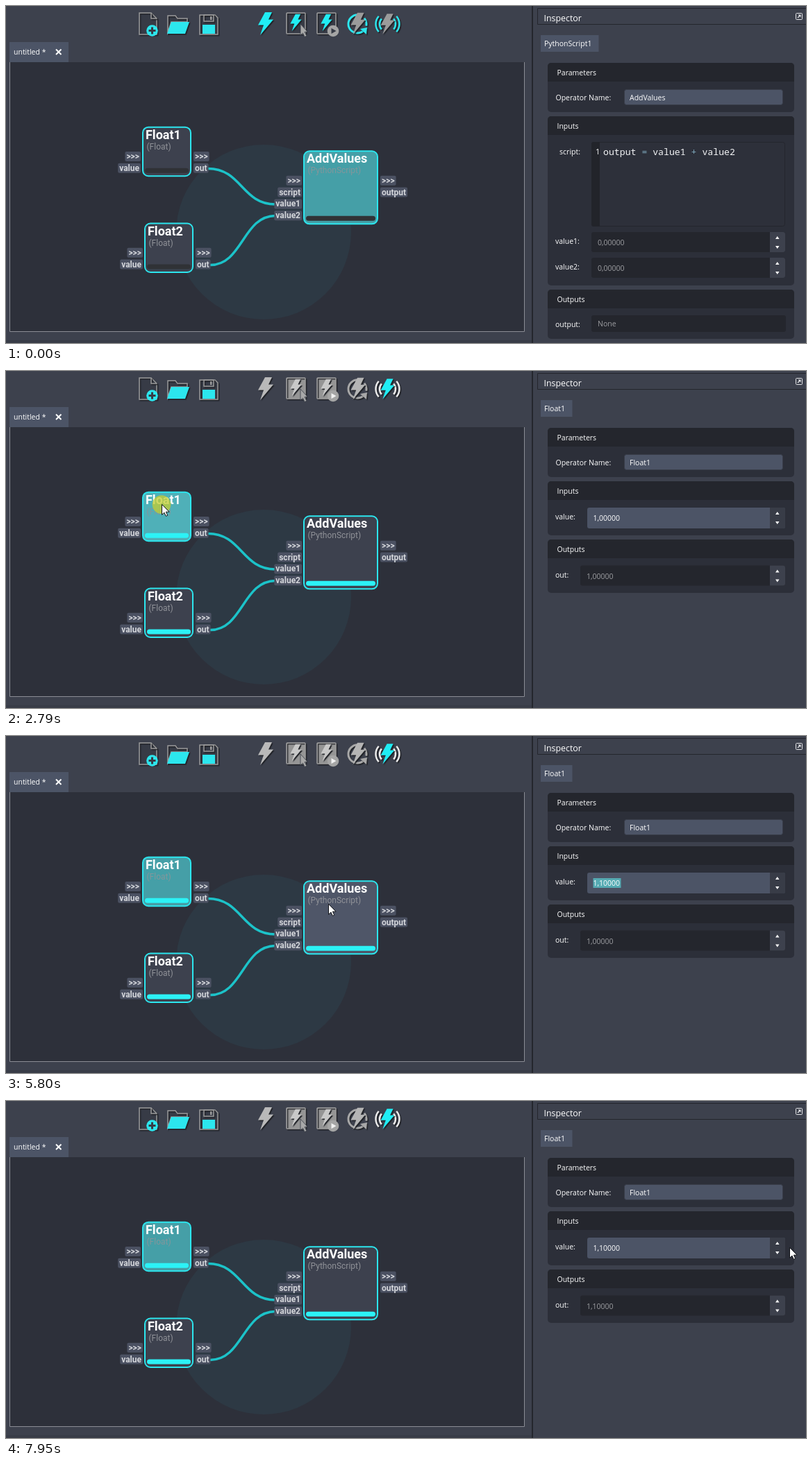
Animation, 1152 px wide and 486 px high, one loop 8000 ms. Source, as an HTML page with a canvas:

```html
<!DOCTYPE html>
<html lang="en">
<head>
<meta charset="utf-8">
<title>Node editor</title>
<style>
html, body { margin: 0; width: 100%; height: 100%; overflow: hidden; background: #3d414d; }
canvas { display: block; }
</style>
</head>
<body>
<canvas id="stage" width="1152" height="486"></canvas>
<script>
const ctx = document.getElementById('stage').getContext('2d');
const LOOP = 8000;
const C = {
  bg: '#3d414d', dark: '#24262d', body: '#2c2f39', field: '#4c5466', cyan: '#2ce6ee', wire: '#1cc3c9',
  teal: '#459fa7', tealHover: '#4fb0b8', text: '#ffffff', dim: '#909298', value: '#9c9da1', icon: '#373b46'
};
const UI = '"Open Sans", "Noto Sans", sans-serif';

// Cursor path: time, x, y
const PATH = [
  [130, 992, 402], [330, 760, 125], [530, 562, 4], [660, 536, 21], [1720, 536, 21],
  [1980, 451, 83], [2510, 224, 192], [3000, 224, 192], [3400, 640, 230], [3800, 1120, 200],
  [3930, 1113, 202], [5070, 1113, 202], [5800, 464, 242], [6550, 464, 242], [6670, 432, 240],
  [6950, 226, 194], [7120, 226, 194], [7820, 1127, 210], [7950, 1128, 211]
];
const CLICKS = [[1450, 1580], [2790, 2850], [4130, 4200], [5940, 6000], [7090, 7150]];

const within = (t, a, b) => t >= a && t < b;
const inside = (p, x, y, w, h) => p && p.x >= x && p.x <= x + w && p.y >= y && p.y <= y + h;

function cursorAt(t) {
  if (t < PATH[0][0]) return null;
  const next = PATH.findIndex(key => key[0] > t);
  if (next < 0) return { x: 1128, y: 211 };
  const [t0, x0, y0] = PATH[next - 1], [t1, x1, y1] = PATH[next];
  const f = (t - t0) / (t1 - t0);
  return { x: Math.round(x0 + (x1 - x0) * f), y: Math.round(y0 + (y1 - y0) * f) };
}

function rect(x, y, w, h, fill, r = 0, stroke, line = 1) {
  ctx.beginPath();
  ctx.roundRect(x, y, w, h, r);
  if (fill) { ctx.fillStyle = fill; ctx.fill(); }
  if (stroke) { ctx.strokeStyle = stroke; ctx.lineWidth = line; ctx.stroke(); }
}

function poly(points, fill, stroke, line = 1) {
  ctx.beginPath();
  points.forEach(([x, y]) => ctx.lineTo(x, y));
  ctx.closePath();
  if (fill) { ctx.fillStyle = fill; ctx.fill(); }
  if (stroke) { ctx.strokeStyle = stroke; ctx.lineWidth = line; ctx.stroke(); }
}

function path(points, color, line) {
  ctx.beginPath();
  points.forEach(([x, y]) => ctx.lineTo(x, y));
  ctx.strokeStyle = color;
  ctx.lineWidth = line;
  ctx.stroke();
}

function disc(x, y, r, fill) {
  ctx.beginPath();
  ctx.arc(x, y, r, 0, Math.PI * 2);
  ctx.fillStyle = fill;
  ctx.fill();
}

function arc(x, y, r, from, to, color, line) {
  ctx.beginPath();
  ctx.arc(x, y, r, from, to);
  ctx.strokeStyle = color;
  ctx.lineWidth = line;
  ctx.stroke();
}

function write(str, x, y, font, color = C.text, align = 'left') {
  ctx.font = font;
  ctx.fillStyle = color;
  ctx.textAlign = align;
  ctx.fillText(str, x, y);
}

const ui = (str, x, y, color, size = 10.5, align) => write(str, x, y, `${size}px ${UI}`, color, align);

function raised(draw) {
  ctx.save();
  ctx.shadowColor = '#202227';
  ctx.shadowOffsetX = ctx.shadowOffsetY = 1.5;
  ctx.shadowBlur = 1;
  draw();
  ctx.restore();
}

const BOLT = [[-1, -16.5], [9, -16.5], [4, -6], [11, -6], [-8, 16.5], [-3, 2], [-11, 2]];
const bolt = (x, y, s, color) =>
  raised(() => poly(BOLT.map(([dx, dy]) => [x + dx * s, y + dy * s]), color));

function fileIcons() {
  raised(() => {
    poly([[192, 10], [209, 10], [217, 18], [217, 41], [192, 41]], C.icon, '#9b9b9b', 1.5);
    path([[209, 10], [209, 18], [217, 18]], '#9b9b9b', 1.5);
  });
  disc(210.5, 35.5, 8.3, C.cyan);
  rect(205.5, 34, 10, 3, C.icon);
  rect(209, 30.5, 3, 10, C.icon);

  raised(() => {
    poly([[233, 38], [233, 14], [244, 14], [247, 18], [261, 18], [261, 23], [238, 23]], C.icon, '#9b9b9b', 1.5);
    poly([[238, 23], [264, 23], [258, 40], [232, 40]], C.cyan);
  });

  raised(() => {
    poly([[279, 13], [301, 13], [305, 17], [305, 41], [279, 41]], C.icon, '#9b9b9b', 1.5);
    rect(285, 13, 14, 9, null, 0, '#9b9b9b', 1.5);
  });
  rect(294, 15, 2.5, 5, '#9b9b9b');
  rect(283, 27, 18, 13, C.cyan);
}

function runIcons(live, highlight) {
  const active = live ? '#b9b9b9' : '#20edf4';
  bolt(374, 25.5, 1, active);
  for (const x of [404, 448]) {
    raised(() => rect(x, 10, 27, 30, live ? '#959595' : C.icon, 1, '#9f9f9f', 1.5));
    bolt(x + 13.5, 24, 0.74, live ? '#c8c8c8' : active);
  }
  poly([[424, 26], [434, 37], [430, 37.5], [433, 43], [430, 44.5], [427.5, 39], [424, 42]],
    '#a9a9a9', C.icon, 0.8);
  disc(471, 36, 8.3, '#a5a5a5');
  poly([[468.5, 32], [475.5, 36], [468.5, 40]], live ? '#f0f0f0' : C.icon);

  const ring = live ? '#a8a8a8' : C.cyan;
  raised(() => {
    arc(506, 26, 13, 0.8, 5.1, ring, 3);
    arc(506, 26, 13, -0.7, 0.2, ring, 3);
    poly([[510, 33], [520, 31], [519, 41]], ring);
  });
  bolt(507, 25.5, 0.95, live ? '#b5b5b5' : '#9b9b9b');

  if (highlight) rect(530, 7, 39, 39, C.field, 3);
  const waves = live ? '#ececec' : C.cyan;
  raised(() => {
    for (const r of [11.5, 17]) {
      arc(549.5, 26, r, -0.72, 0.72, waves, 2.5);
      arc(549.5, 26, r, Math.PI - 0.72, Math.PI + 0.72, waves, 2.5);
    }
  });
  bolt(549.5, 26, 0.9, live ? '#20edf4' : '#9b9b9b');
}

function port(label, edge, cy, side) {
  ctx.font = 'bold 12px Roboto, sans-serif';
  const w = ctx.measureText(label).width + 4;
  const x = side === 'in' ? edge - w : edge;
  rect(x, cy - 7, w, 14, '#4b5162', 2);
  write(label, x + 2, cy + 4, ctx.font, '#d3d5da');
}

function node({ x, y, w, h, name, type, ins, outs, first }, selected, hover, done) {
  const fill = selected ? (hover ? C.tealHover : C.teal) : (hover ? '#4f5668' : '#3d414e');
  rect(x, y, w, h, fill, 8, C.cyan, 2);
  write(name, x + 4, y + 17, 'bold 18px Roboto, sans-serif', '#ffffff');
  write(type, x + 5.5, y + 32, '12px Roboto, sans-serif', selected ? '#84969b' : C.dim);
  rect(x + 3, y + h - 11.5, w - 6, 7, done ? '#2cf2f6' : '#303236', 3.5);
  ins.forEach((p, i) => port(p, x - 3, y + first + i * 16.8, 'in'));
  outs.forEach((p, i) => port(p, x + w + 4, y + first + i * 16.8, 'out'));
}

function wire(x1, y1, x2, y2) {
  const mid = (x1 + x2) / 2;
  ctx.beginPath();
  ctx.moveTo(x1, y1);
  ctx.bezierCurveTo(mid, y1, mid, y2, x2, y2);
  ctx.strokeStyle = C.wire;
  ctx.lineWidth = 3.4;
  ctx.stroke();
}

function graph(t, cursor, selected, live) {
  rect(5, 81, 742, 389, '#2d303a');
  path([[5.5, 81], [5.5, 469.5], [746.5, 469.5], [746.5, 81]], '#8b8d95', 1);
  ctx.save();
  ctx.beginPath();
  ctx.rect(6, 82, 740, 387);
  ctx.clip();
  disc(371, 326, 126, '#2d3944');
  ctx.restore();

  const shift = t >= 6000 ? 1 : 0;
  const float = (x, y, name) => ({
    x, y, w: 69, h: 70.5, name, type: '(Float)', first: 42.3, ins: ['>>>', 'value'], outs: ['>>>', 'out']
  });
  const nodes = [
    float(197, 174.7, 'Float1'),
    float(200, 313.5, 'Float2'),
    {
      x: 429, y: 209.3 + shift, w: 106, h: 105, name: 'AddValues', type: '(PythonScript)', first: 42.5,
      ins: ['>>>', 'script', 'value1', 'value2'], outs: ['>>>', 'output']
    }
  ];
  wire(291, 234.5, 388, 286 + shift);
  wire(294, 373.5, 388, 302.5 + shift);
  for (const n of nodes) {
    const pending = n.name === 'Float1' && within(t, 4130, 4610);
    node(n, n.name === selected, inside(cursor, n.x, n.y, n.w, n.h), live && !pending);
  }
}

function group(title, y, h) {
  rect(780, y, 355, h, C.body, 5);
  rect(780, y, 355, 27, C.dark, [5, 5, 0, 0]);
  ui(title, 793.5, y + 17.5);
}

function spin(x, y, value, { enabled, hover, picked } = {}) {
  const h = enabled ? 30 : 29;
  rect(x, y, 1122 - x, h, enabled ? C.field : C.dark, 3);
  rect(1100, y, 22, h, enabled ? '#383c47' : '#3d414d', [0, 3, 3, 0]);
  if (hover) {
    rect(1100, y, 22, 15, C.teal, [0, 3, 0, 0]);
    rect(x - 0.5, y - 0.5, 1123 - x, h, null, 3, C.teal);
  }
  const tx = x + (enabled ? 8.5 : 9);
  if (picked) rect(tx, y + 8, 40, 14, '#55aab2');
  ui(value, tx, y + 19, enabled ? C.text : C.value);
  poly([[1108, y + 10], [1113.5, y + 10], [1110.75, y + 6]], '#ffffff');
  poly([[1108, y + 20], [1113.5, y + 20], [1110.75, y + 24]], '#ffffff');
}

function pythonPanel(value1, value2, output) {
  group('Inputs', 159, 244);
  ui('script:', 827, 214, C.text, 10.5, 'right');
  rect(843.5, 196.5, 278, 121, '#2d303a', 3, '#24262d');
  rect(843, 196, 12, 122, '#22242a', [3, 0, 0, 3]);
  ui('1', 849, 213.5, C.text, 11);
  const mono = '13.2px "Noto Sans Mono", "DejaVu Sans Mono", monospace';
  write('output   value1   value2', 860, 215, mono, '#f2f3f5');
  write('       =        +', 860, 215, mono, '#7fa9bd');
  ui('value1:', 791, 343);
  spin(843, 326, value1);
  ui('value2:', 791, 380);
  spin(843, 363, value2);

  group('Outputs', 409, 71);
  ui('output:', 791, 463);
  rect(843, 446, 280, 24, C.dark, 3);
  ui(output, 852, 462, C.value);
}

function floatPanel(t, value, out, hover) {
  group('Inputs', 159, 78);
  ui('value:', 791, 214);
  spin(837, 197, value, { enabled: true, hover, picked: within(t, 4130, 5940) });
  group('Outputs', 243, 77);
  ui('out:', 791, 297.5);
  spin(827, 280.5, out);
}

function inspector(t, cursor, selected, live) {
  rect(757, 0, 2, 486, '#24262d');
  rect(765.5, 3.5, 392, 23, null, 0, '#24262d');
  ui('Inspector', 774.5, 22, C.text, 12.4);
  rect(1137.5, 10.5, 9, 9, null, 1, '#e4e5e8');
  poly([[1140.5, 12.5], [1144.5, 12.5], [1144.5, 16.5]], '#e4e5e8');
  path([[1140, 17], [1143, 14]], '#e4e5e8', 1.2);

  const python = selected === 'AddValues';
  rect(770, 42, python ? 83.5 : 45.5, 24, C.field);
  ui(python ? 'PythonScript1' : 'Float1', 775, 58);
  group('Parameters', 82, 71);
  ui('Operator Name:', 791.5, 136);
  rect(890.5, 120.5, 228, 22, C.field, 3, '#383c48');
  ui(selected, 898, 135.5);

  const stepped = t >= 4130;
  const value = stepped ? '1,10000' : '1,00000';
  if (python) {
    pythonPanel(live ? value : '0,00000', live ? '2,50000' : '0,00000',
      live ? (stepped ? '3.6' : '3.5') : 'None');
  } else {
    floatPanel(t, value, t >= 7090 ? '1,10000' : '1,00000', inside(cursor, 837, 197, 285, 30));
  }
}

function pointer({ x, y }, clicking) {
  if (clicking) disc(x, y + 0.5, 13.3, 'rgba(196, 205, 50, 0.76)');
  const shape = [[0, 0], [0, 15], [3.4, 11.8], [5.8, 17], [8.2, 16], [5.9, 10.9], [10.6, 10.9]];
  poly(shape.map(([dx, dy]) => [x + dx + 0.5, y + dy + 0.3]), '#ffffff', '#111318', 1);
}

function draw(t) {
  const cursor = cursorAt(t);
  const live = t >= 1780;
  const selected = within(t, 2790, 5940) || t >= 7090 ? 'Float1' : 'AddValues';

  rect(0, 0, 1152, 486, C.bg);
  rect(0, 482, 757, 4, '#383c47');
  fileIcons();
  runIcons(live, within(t, 590, 2050));
  rect(5, 52, 85, 29, C.field);
  ui('untitled *', 11, 70);
  path([[72, 62.5], [79.5, 70]], '#ffffff', 2);
  path([[79.5, 62.5], [72, 70]], '#ffffff', 2);

  graph(t, cursor, selected, live);
  inspector(t, cursor, selected, live);
  if (cursor) pointer(cursor, CLICKS.some(([a, b]) => within(t, a, b)));
}

const start = performance.now();
function frame() {
  draw((performance.now() - start) % LOOP);
  requestAnimationFrame(frame);
}
frame();
</script>
</body>
</html>
```
